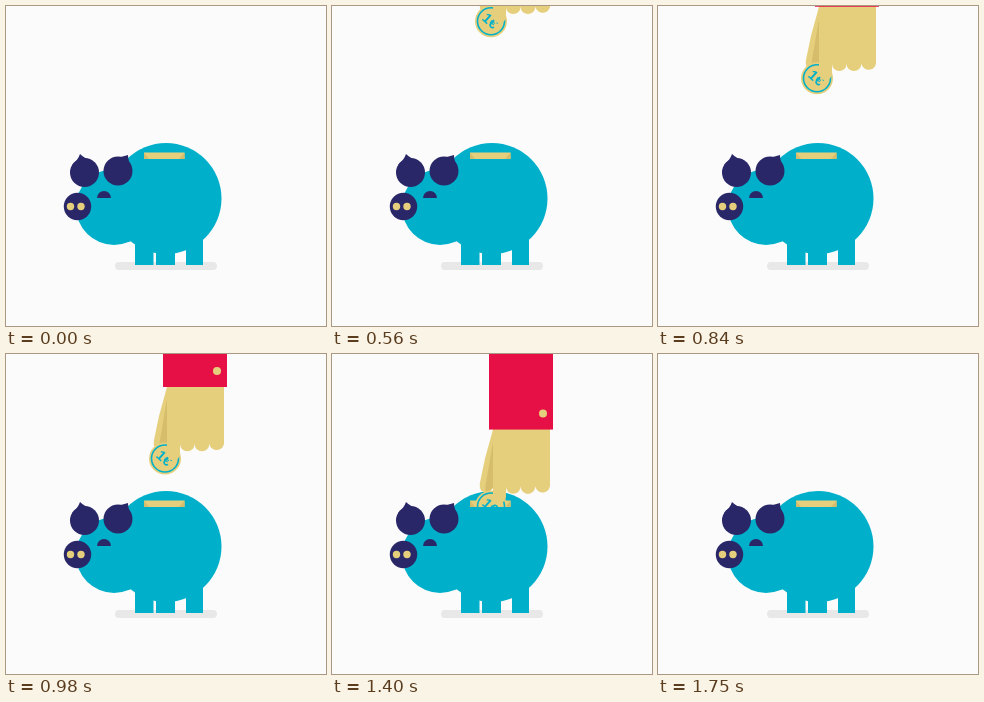
Animation of 320 by 320 pixels, one loop 2.1 s. Source, as an HTML page:

```html
<!DOCTYPE html>
<html lang="en">
<head>
<meta charset="utf-8">
<title>Piggy bank</title>
<style>
  html, body { margin: 0; height: 100%; overflow: hidden; background: #fbfbfb; }
  svg { display: block; width: 100%; height: 100%; }
  .teal { fill: #00b0cb; }
  .navy { fill: #2a2768; }
  .gold { fill: #e6cf7c; }
  .shade { fill: #d6bd6c; }
  .red { fill: #e60f46; }
  text { font: bold 14px "Liberation Sans", Arial, sans-serif; text-anchor: middle; }
</style>
</head>
<body>
<svg viewBox="0 0 320 320">
  <clipPath id="above"><rect width="320" height="153"/></clipPath>

  <rect x="109" y="256" width="102" height="8" rx="4" fill="#e8e8e8"/>
  <g class="teal">
    <circle cx="160" cy="192.5" r="55.5"/>
    <circle cx="108" cy="201" r="38"/>
    <path d="M122 236L129 234V259H147.500V240H150V259H169V240H180V259H197V225H129Z"/>
  </g>
  <g class="navy">
    <circle cx="78.500" cy="166.500" r="14.500"/>
    <path d="M66 159Q72 154 74 148Q79 153 87 155L80 168Z"/>
    <circle cx="112" cy="165" r="14.500"/>
    <path d="M104 153Q113 152 122 149Q122 155 125.500 160L112 166Z"/>
    <circle cx="71.500" cy="200.500" r="13.700"/>
    <path d="M91 192a7 7 0 0 1 14 0Z"/>
  </g>
  <g class="gold">
    <circle cx="64.500" cy="200.500" r="3.700"/>
    <circle cx="75" cy="200.500" r="3.700"/>
    <rect x="138" y="146.500" width="40.500" height="6.500"/>
  </g>
  <path class="shade" d="M138 146.500L143 153H138ZM178.500 146.500L173 153H178.500Z"/>

  <g clip-path="url(#above)">
    <!-- Hand coordinates: y = 0 is the lower edge of the cuff -->
    <g id="hand">
      <path class="gold" d="M161 0L153 29L147.800 54Q147 62 153 63Q158 63 163 56V0Z"/>
      <path class="shade" d="M161 12L153.500 56Q153 61 154 63Q159 62 164 54V12Z"/>
      <g id="coin">
        <circle class="gold" cx="159" cy="71.500" r="16"/>
        <circle cx="159" cy="71.500" r="13.500" fill="none" stroke="#00b0cb" stroke-width="1.600"/>
        <text class="teal" transform="translate(158.500 71) rotate(42)" y="5">1€</text>
      </g>
      <path class="gold" d="M161 -2V67a6.500 6.500 0 0 0 13 0V57a7.300 7.300 0 0 0 14.600 0a7.300 7.300 0 0 0 14.700 0a7.300 7.300 0 0 0 14.700 -3V-2Z"/>
      <rect class="red" x="157" y="-200" width="64" height="200"/>
      <circle class="gold" cx="211" cy="-16" r="4"/>
    </g>
  </g>
</svg>
<script>
  const LOOP = 2100, STEP = 70, LOWEST = 81;
  const hand = document.getElementById('hand');
  const coin = document.getElementById('coin');
  const moveY = (el, y) => el.setAttribute('transform', `translate(0 ${y})`);

  // Height of the cuff edge; n counts steps since the hand appears
  function handY(n) {
    if (n < 0 || n >= 19) return -150;
    if (n <= 8) return -81 + 11.75 * n + 0.3125 * n * n;
    if (n <= 13) return LOWEST - 48 * (1 - (n - 8) / 5) ** 1.75;
    return LOWEST - 5.44 * (n - 13) ** 2;
  }

  function draw(now) {
    const n = Math.floor(now % LOOP / STEP) - 6;
    const y = handY(n);
    const released = LOWEST + 14 * Math.max(0, n - 14);
    moveY(hand, y);
    moveY(coin, n > 13 && n < 19 ? released - y : 0);
    requestAnimationFrame(draw);
  }
  draw(0);
</script>
</body>
</html>
```
